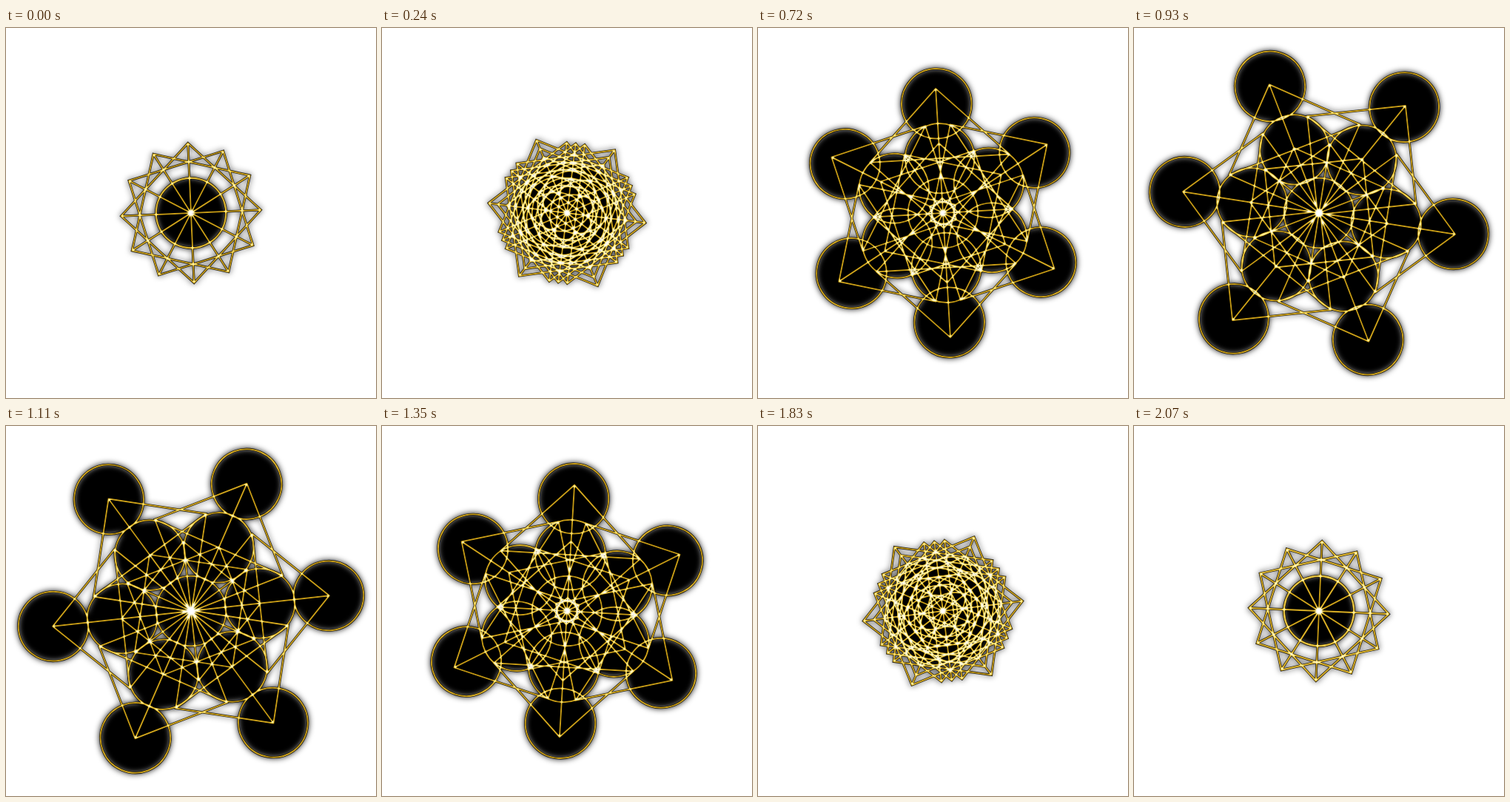
These frames come from a looping animation (500 px wide and 500 px high, 2.1 s). An HTML page:

```html
<!DOCTYPE html>
<html lang="en">
<head>
<meta charset="utf-8">
<title>Unfolding geometry</title>
<style>
  html, body { margin: 0; width: 100%; height: 100%; overflow: hidden; background: #fff; }
  svg { display: block; width: 100%; height: 100%; }
</style>
</head>
<body>
<svg viewBox="0 0 500 500">
  <defs>
    <path id="rings"/>
    <path id="lines" fill="none"/>
    <filter id="glow" filterUnits="userSpaceOnUse" x="0" y="0" width="500" height="500">
      <feGaussianBlur stdDeviation="4"/>
    </filter>
    <!-- thin strokes turn gold, thick overlaps turn white -->
    <filter id="gold" filterUnits="userSpaceOnUse" x="0" y="0" width="500" height="500" color-interpolation-filters="sRGB">
      <feGaussianBlur in="SourceAlpha" stdDeviation="1"/>
      <feColorMatrix values="0 0 0 1 0  0 0 0 1 0  0 0 0 1 0  0 0 0 0 1"/>
      <feComponentTransfer>
        <feFuncR type="table" tableValues=".3 .35 .5 .8 .98 1"/>
        <feFuncG type="table" tableValues=".22 .26 .38 .63 .88 1"/>
        <feFuncB type="table" tableValues="0 0 0 .1 .4 1"/>
      </feComponentTransfer>
      <feComposite in2="SourceAlpha" operator="in"/>
    </filter>
  </defs>
  <g stroke="#000" stroke-width="2" filter="url(#glow)">
    <use href="#rings"/><use href="#lines"/>
  </g>
  <g fill="none" stroke="#000" stroke-opacity=".8" stroke-width="3.2">
    <use href="#rings"/><use href="#lines"/>
  </g>
  <g fill="none" stroke="#000" stroke-width="2" filter="url(#gold)">
    <use href="#rings"/><use href="#lines"/>
  </g>
</svg>
<script>
const STEP = 30, STEPS = 70, CENTER = 250, RADIUS = 47.25, HALF = 94.5;
const rings = document.getElementById('rings');
const lines = document.getElementById('lines');
const rad = deg => deg * Math.PI / 180;

// Point at a distance along an arm and an offset across it.
function point(angle, along, across = 0) {
  const c = Math.cos(angle), s = Math.sin(angle);
  const x = CENTER + along * c - across * s;
  const y = CENTER - along * s - across * c;
  return x.toFixed(2) + ' ' + y.toFixed(2);
}

function ring(angle, dist) {
  const arc = `A${RADIUS} ${RADIUS} 0 0 1 `;
  const a = point(angle, dist - RADIUS), b = point(angle, dist + RADIUS);
  return `M${a}${arc}${b}${arc}${a}Z`;
}

// Square with both diagonals, one corner pointing outward.
function square(angle, dist) {
  const tip = point(angle, dist + HALF), tail = point(angle, dist - HALF);
  const left = point(angle, dist, HALF), right = point(angle, dist, -HALF);
  return `M${tip}L${left}L${tail}L${right}ZL${tail}M${left}L${right}`;
}

function draw(step) {
  const turn = 30 + 180 * (step + 1) / (STEPS + 1);
  const dist = HALF / 2 * (1 - Math.cos(2 * Math.PI * (step + 0.2) / STEPS));
  let circles = ring(0, 0), squares = '';
  for (let arm = 0; arm < 6; arm++) {
    const angle = rad(turn + arm * 60);
    circles += ring(angle, dist) + ring(angle, 2 * dist);
    // one square stays in the middle as part of a star, one travels out
    squares += square(angle, 0) + square(angle, dist);
  }
  rings.setAttribute('d', circles);
  lines.setAttribute('d', squares);
}

let start, last = 0;
function tick(now) {
  start ??= now;
  const step = Math.floor(Math.max(0, now - start) / STEP) % STEPS;
  if (step !== last) draw(last = step);
  requestAnimationFrame(tick);
}
draw(0);
requestAnimationFrame(tick);
</script>
</body>
</html>
```
